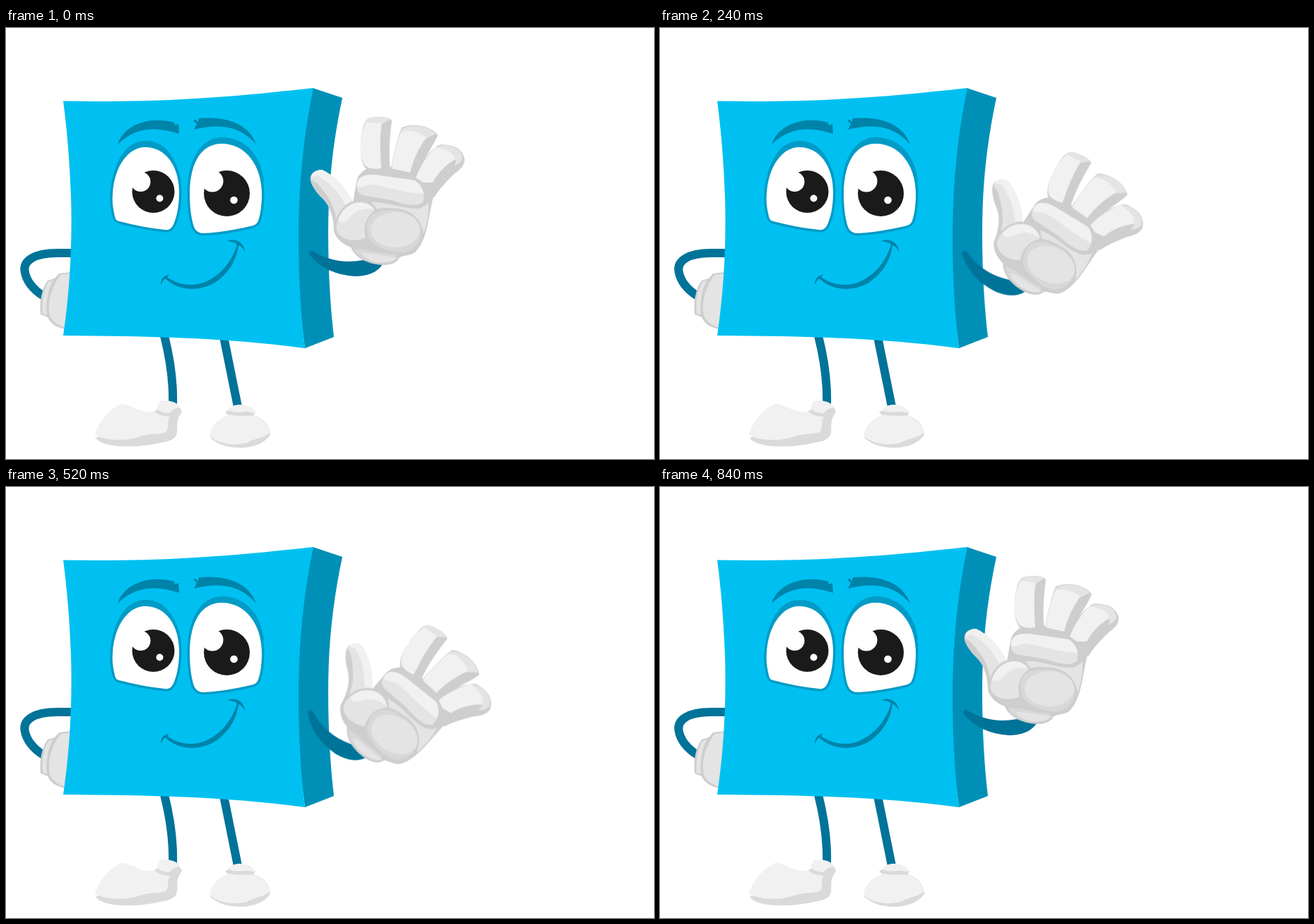
An HTML page without scripts that plays this animation: 917 by 611 pixels, repeating every 0.88 s.

```html
<!DOCTYPE html>
<html lang="en">
<head>
<meta charset="utf-8">
<title>Waving cube</title>
<style>
html, body { margin: 0; width: 100%; height: 100%; overflow: hidden; background: #fff; }
svg { display: block; width: 100vw; height: 100vh; }

.front { fill: #00c0f1; }
.side  { fill: #0090b7; }
.limb  { fill: none; stroke: #007399; stroke-width: 12; }
.sleeve { fill: #007399; }
.ink   { fill: #0083a9; }
.lid   { fill: #039bc6; }
.eye   { fill: #fff; stroke: #039bc6; stroke-width: 7; paint-order: stroke; }
.white { fill: #fff; }
.pupil { fill: #1a1a1a; }
.sole  { fill: #dadada; }
.shade { fill: #cecece; }
.mid   { fill: #e4e4e4; }
.light { fill: #f1f1f1; }
.soft  { fill: #d8d8d8; }

/* Out in ten poses, a double hold, then back the same way */
.wave {
  transform-origin: 432px 316px;
  animation: wave 880ms infinite;
}
@keyframes wave {
  0%       { transform: rotate(0deg);    animation-timing-function: steps(2); }
  9.0909%  { transform: rotate(8.2deg);  animation-timing-function: steps(4); }
  27.2727% { transform: rotate(23.4deg); animation-timing-function: steps(4); }
  45.4545% { transform: rotate(38deg); }
  50%      { transform: rotate(38deg);   animation-timing-function: steps(4); }
  68.1818% { transform: rotate(23.4deg); animation-timing-function: steps(4); }
  86.3636% { transform: rotate(8.2deg);  animation-timing-function: steps(2); }
  95.4545%, 100% { transform: rotate(0deg); }
}
</style>
</head>
<body>
<svg viewBox="0 0 917 611" preserveAspectRatio="none">
  <!-- Arm on the hip -->
  <path class="limb" d="M95 319H72C40 319 24 330 26.500 345C29 360 39 371 53 380"/>
  <path class="shade" d="M92 346L75 348L69 355L59 358C50 370 47 390 49 406L59 410C63 420 74 426 86 427Z"/>
  <path class="mid" d="M67 357L60 360C53 372 50 390 52 405L58 407C56 390 59 370 67 357Z"/>
  <path class="mid" d="M92 348L77 350C64 368 58 390 62 408C66 417 75 423 86 425Z"/>

  <!-- Legs -->
  <path class="limb" d="M224 436C232 468 237 500 236 533M308.500 440L328 537"/>

  <!-- Shoes -->
  <path class="sole" d="M127 581C131 588 145 592 162 593C183 594 202 592 218 588C232 586 241 583 242 573C243 564 241 559 245 551L249 544C247 537 240 532 229 529L218 529L214 541L180 560Z"/>
  <path class="light" d="M126 577C130 560 145 541 163 533C177 533 190 547 211 544C215 549 226 551 232 551C227 558 232 566 226 573C213 577 202 574 187 580C166 587 139 584 126 577Z"/>
  <path class="light" d="M214 540C213 532 219 528 227 528C236 529 243 532 246 537C241 540 237 539 232 546C225 546 218 544 214 540Z"/>
  <path class="sole" d="M289 581C300 590 312 595 332 595C351 595 369 587 374 576C372 560 362 553 350 549L353 545L345 537L323 536L310 545L316 550Z"/>
  <path class="light" d="M288 578C290 563 301 553 317 548C330 551 342 549 351 550C364 554 372 564 373 574C363 582 350 582 341 588C321 593 299 589 288 578Z"/>
  <path class="light" d="M314 542C318 536 324 534 331 534C341 534 350 538 353 545C348 547 345 543 338 544C329 545 321 545 314 542Z"/>

  <!-- Cube -->
  <path class="side" d="M434 85L476 99C463 160 456 220 456 290C456 345 459 395 464 438L423 454L400 270Z"/>
  <path class="front" d="M81 103.500C215 106 310 99 435 85C421 150 414 225 414 295C414 355 417 405 423 454C310 439 210 437 81 436C90 375 94 310 92 240C90 190 87 150 81 103.500Z"/>

  <!-- Brows -->
  <path class="ink" d="M158 165C166 138 202 124 238 134L239 138L244 136L245 150C210 138 181 142 158 165Z"/>
  <path class="ink" d="M265 131L269 130L271 134L273 128C310 125 343 134 354 165C333 140 304 134 266 144L270 136Z"/>

  <!-- Eyes -->
  <path class="lid" d="M149 225C154 184 172 160 198 160C222 160 239 178 247 215Z"/>
  <path class="eye" d="M154 267C151 255 150 245 151 235C153 198 172 169 197 169C226 169 245 196 245 232C245 252 242 266 238 276C235 284 231 287 225 286C204 284 180 279 160 274C156 273 155 271 154 267Z"/>
  <path class="lid" d="M258 215C262 178 280 155 306 155C338 155 361 180 365 217Z"/>
  <path class="eye" d="M264 275C261 262 260 250 260 232C261 190 277 164 305 164C340 164 362 196 362 235C362 252 360 264 357 273C355 278 352 280 346 281C325 286 300 290 280 291C269 291 266 284 264 275Z"/>
  <circle class="pupil" cx="208.500" cy="232" r="30"/>
  <circle class="white" cx="190.500" cy="218" r="14"/>
  <circle class="white" cx="217.500" cy="241.500" r="5"/>
  <circle class="pupil" cx="312.500" cy="234.500" r="32.500"/>
  <circle class="white" cx="292" cy="217" r="15.500"/>
  <circle class="white" cx="322.500" cy="244" r="5.300"/>

  <!-- Smile -->
  <path class="ink" d="M219 364C219 355 224 350 231 350L228 353C244 365 267 368 286 358C306 348 320 330 327 307C324 304 320 303 313 302C326 297 338 305 338 318C336 313 333 309 329 308C326 331 313 351 292 363C268 375 242 371 225 355C222 358 221 361 219 364Z"/>

  <!-- Waving arm -->
  <g class="wave">
    <path class="sleeve" d="M434 316C455 329 478 334 505 329L533 335C525 347 511 352 494 352C467 350 446 341 430 322C428 318 430 315 434 316Z"/>

    <!-- Palm and thumb silhouette -->
    <path class="shade" d="M431 217C429 208 436 201 447 201C460 207 477 222 491 247L496 218C498 207 505 203 512 198L545 197L580 207L608 232C603 240 602 254 599 267C595 290 590 307 579 318C572 323 564 322 557 325C553 335 538 338 524 335C507 332 493 324 488 311C477 307 467 299 464 288C464 270 459 252 447 241C438 232 433 224 431 217Z"/>

    <!-- Thumb -->
    <path class="mid" d="M432 215C430 208 436 202 447 201C463 208 480 224 490 246C479 251 471 259 467 271C465 248 449 230 440 220Z"/>
    <path class="light" d="M432 212C431 206 438 201 447 201C463 208 480 224 490 245L480 250C470 230 455 216 440 209C437 210 435 211 432 212Z"/>

    <!-- Index finger -->
    <path class="shade" d="M502 165C503 145 507 131 513 128C523 125 540 125 546 131C543 155 541 178 544 201C533 208 517 207 508 198C503 190 501 180 502 165Z"/>
    <path class="mid" d="M507 136C508 130 515 126 522 126C533 126 540 127 543 130L533 136Z"/>
    <path class="light" d="M502 165C503 148 506 139 510 134C518 133 525 135 532 135C528 156 530 180 531 199C522 201 514 199 509 196C503 188 501 178 502 165Z"/>

    <!-- Middle finger -->
    <path class="shade" d="M545 199C548 180 553 159 560 141C576 134 602 138 611 152C603 172 587 187 581 214L548 208Z"/>
    <path class="mid" d="M558 145C572 134 598 138 608 150L594 157Z"/>
    <path class="light" d="M546 199C548 180 553 162 559 147C571 143 585 147 595 155C586 168 577 183 572 205C563 202 554 202 546 199Z"/>

    <!-- Little finger -->
    <path class="shade" d="M576 212C584 196 594 179 609 168C612 164 622 165 630 167C640 169 648 177 649 186C649 194 644 199 639 203C628 212 615 226 606 240L585 225Z"/>
    <path class="light" d="M580 212C586 196 596 180 608 169C620 170 632 174 640 184C627 190 612 203 604 219L590 219Z"/>
    <path class="mid" d="M608 169C618 163 643 167 646 183C645 190 640 193 634 196C640 187 636 173 608 169Z"/>

    <!-- Knuckle pad -->
    <path class="mid" d="M497 225C495 213 505 207 522 208L578 216C589 222 594 236 590 247C579 255 560 249 545 244L510 238C500 237 496 231 497 225Z"/>
    <path class="light" d="M497 225C495 213 505 207 522 208L578 216C586 221 590 228 591 235C569 235 540 225 518 222C509 222 502 228 497 225Z"/>

    <!-- Base of the thumb -->
    <path class="mid" d="M468 279C472 260 486 248 501 247C513 249 520 254 522 259C509 267 505 282 509 297C495 304 478 301 471 292C468 288 467 284 468 279Z"/>
    <path class="light" d="M470 273C474 257 488 247 502 247C512 248 518 252 521 257C505 255 493 259 486 270C480 276 474 276 470 273Z"/>

    <!-- Heel of the palm -->
    <path class="mid" d="M517 247C537 245 561 257 583 256C591 254 596 250 598 247C599 262 595 282 591 292C588 270 572 257 552 256C541 255 532 255 525 257Z"/>
    <path class="soft" d="M510 281C511 268 520 260 534 259C559 255 584 265 587 286C588 302 577 317 562 318C543 319 517 308 512 296Z"/>
    <ellipse class="mid" cx="551" cy="286" rx="35" ry="25"/>

    <!-- Cuff -->
    <path class="soft" d="M492 313C509 312 526 319 552 321C551 331 536 334 523 332C507 329 496 322 492 313Z"/>
    <path class="mid" d="M503 319C519 318 536 324 554 325C549 333 535 333 524 332C514 329 508 326 503 319Z"/>
  </g>
</svg>
</body>
</html>
```
